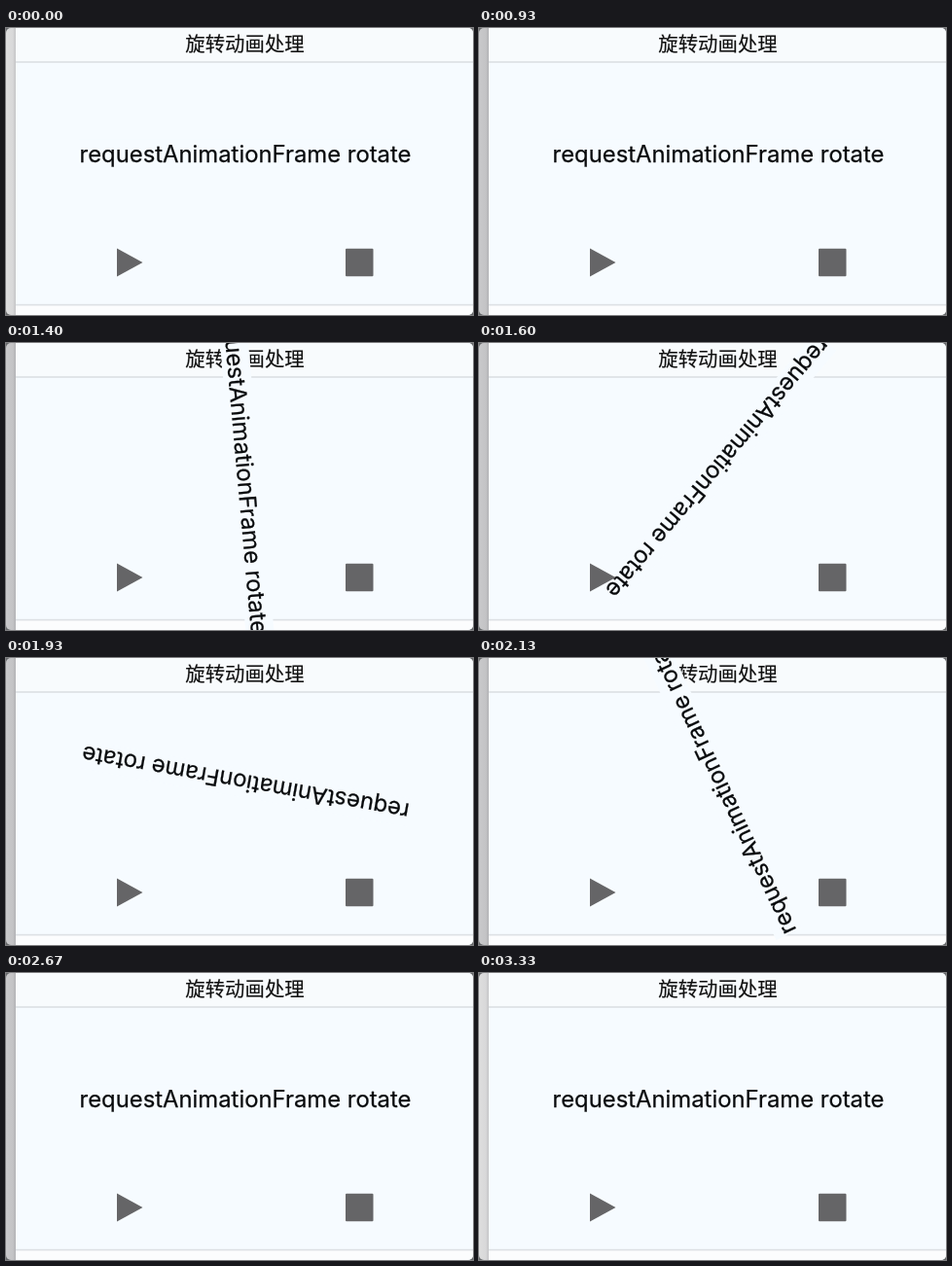
An HTML page with a canvas that plays this animation: 480x295 px, repeating every 3740 ms.

```html
<!DOCTYPE html>
<html lang="zh">
<head>
<meta charset="utf-8">
<title>旋转动画处理</title>
<style>
html, body { margin: 0; width: 100%; height: 100%; overflow: hidden; background: #fff; }
canvas { display: block; width: 480px; height: 295px; }
</style>
</head>
<body>
<canvas id="stage" width="480" height="295"></canvas>
<script>
const W = 480, H = 295, LOOP = 3740, TICK = 1000 / 15;
const PANEL = '#f6fbff', INK = '#080a0c', BUTTON = '#656567', RULE = '#dde0e4';
const LABEL = 'requestAnimationFrame rotate';
const PIVOT = { x: 246, y: 129 };
const ctx = document.getElementById('stage').getContext('2d');

// [time in ms, angle in degrees]
const spin = [[933, 0], [1000, 2], [1067, 10], [1200, 39.6], [1600, 130.2], [1933, 190], [2333, 299.5], [2467, 322]];
const SPIN_END = 2525;

function angleAt(t) {
  if (t < 930 || t >= SPIN_END) return 0;
  // The screen advances at 15 pictures a second
  const now = Math.floor((t + 6) / TICK) * TICK;
  for (let i = 1; i < spin.length; i++) {
    const [t0, a0] = spin[i - 1], [t1, a1] = spin[i];
    if (now <= t1) return a0 + (a1 - a0) * Math.max(0, (now - t0) / (t1 - t0));
  }
  return spin[spin.length - 1][1];
}

function rect(color, x, y, w, h) {
  ctx.fillStyle = color;
  ctx.fillRect(x, y, w, h);
}

// A thin outline gives the letters a slightly stronger weight
function write(text, x, y, font, color, weight) {
  ctx.font = font;
  ctx.fillStyle = ctx.strokeStyle = color;
  ctx.lineWidth = weight;
  ctx.lineJoin = 'round';
  ctx.fillText(text, x, y);
  ctx.strokeText(text, x, y);
}

function drawSideBar(dark) {
  const g = ctx.createLinearGradient(0, 0, 10, 0);
  g.addColorStop(0, dark ? '#c9c9cb' : '#dedede');
  g.addColorStop(0.7, dark ? '#c3c3c5' : '#d8d8d9');
  g.addColorStop(1, dark ? '#b2b2b5' : '#c4c4c6');
  rect(g, 0, 0, 10, H);
}

function drawPanel() {
  rect(PANEL, 10, 0, W - 10, H);
  rect('#f8fbfd', 10, 0, W - 10, 35);
  rect(RULE, 10, 34.2, W - 10, 1.6);
  rect('#fcfdfe', 10, 285, W - 10, 10);
  rect(RULE, 10, 283.8, W - 10, 1.6);
  write('旋转动画处理', 245.5, 24, '20.4px "Noto Sans CJK SC", "Noto Sans CJK", sans-serif', '#111', 0.15);
}

function drawLabel(degrees) {
  ctx.save();
  ctx.translate(PIVOT.x, PIVOT.y);
  ctx.rotate(degrees * Math.PI / 180);
  rect(PANEL, -171, -14.5, 342, 29);
  write(LABEL, 0, 9, '23.85px Inter, sans-serif', INK, 0.25);
  ctx.restore();
}

function drawButtons() {
  ctx.fillStyle = BUTTON;
  ctx.beginPath();
  ctx.moveTo(114, 226.5);
  ctx.lineTo(140.5, 241);
  ctx.lineTo(114, 255.5);
  ctx.fill();
  ctx.beginPath();
  ctx.roundRect(349, 226.8, 28.5, 28.5, 1);
  ctx.fill();
}

function draw(t) {
  rect('#66686a', 0, 0, W, H);
  ctx.save();
  ctx.beginPath();
  ctx.roundRect(0, 0, W, H, 5);
  ctx.clip();
  ctx.textAlign = 'center';
  drawSideBar(t >= 925 && t < 3325);
  drawPanel();
  ctx.beginPath();
  ctx.rect(10, 0, W - 10, H);
  ctx.clip();
  drawLabel(angleAt(t));
  drawButtons();
  ctx.restore();
}

const start = performance.now();
function loop() {
  draw((performance.now() - start) % LOOP);
  requestAnimationFrame(loop);
}
loop();
</script>
</body>
</html>
```
